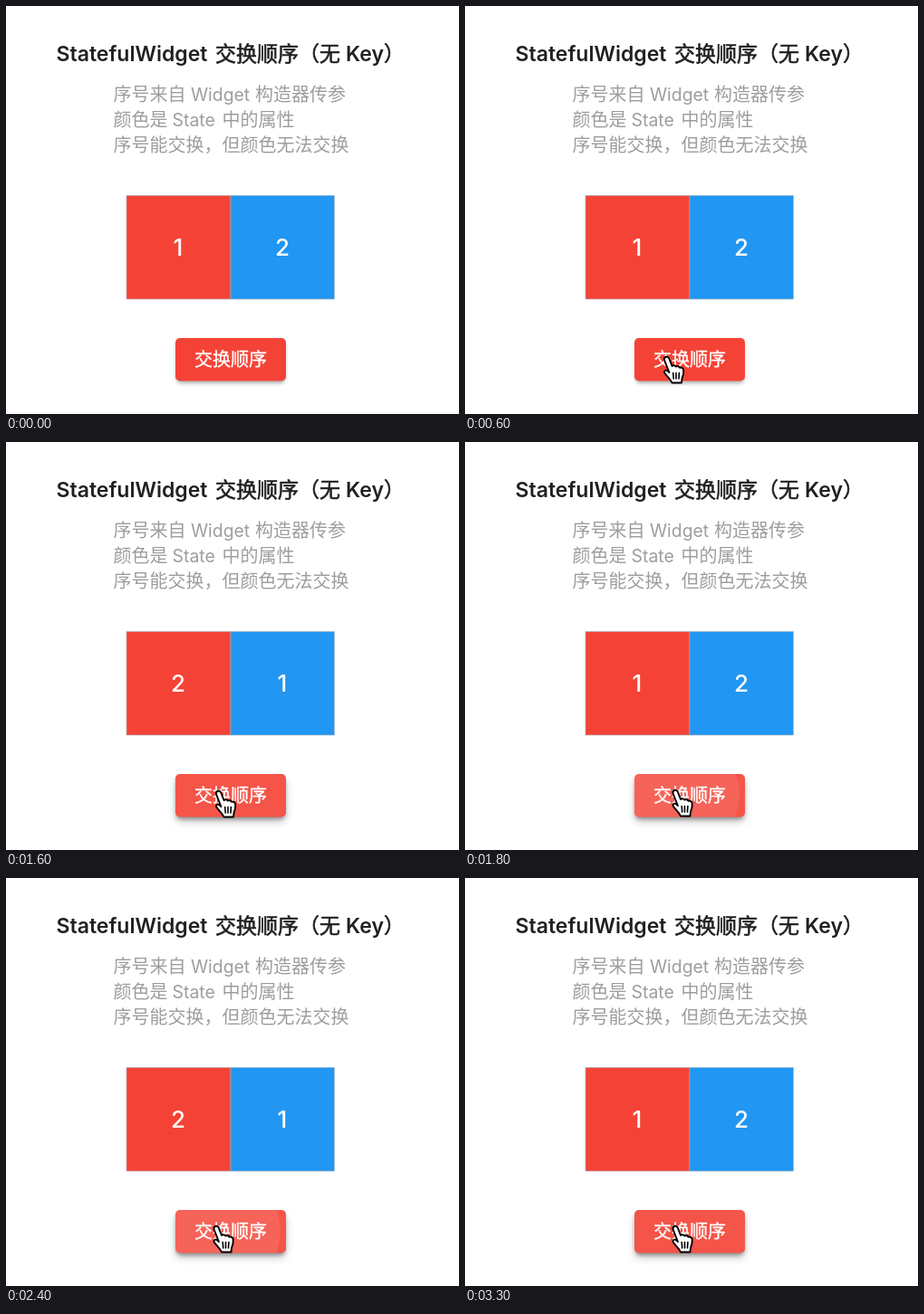
Write an HTML page that moves like this. It is 500 px wide and 451 px high and loops after 3.4 s.

```html
<!DOCTYPE html>
<html lang="zh-CN">
<head>
<meta charset="utf-8">
<style>
  html, body { margin: 0; width: 100%; height: 100%; overflow: hidden; background: #fff; }
  svg { display: block; width: 500px; height: 451px; }
  text { font-family: Inter, "Noto Sans CJK SC", "Noto Sans CJK", sans-serif; white-space: pre; }
  .cjk { font-family: "Noto Sans CJK SC", "Noto Sans CJK", sans-serif; }
  .title { font-size: 23px; font-weight: 600; fill: #202020; }
  .title .cjk { font-weight: 400; stroke: #202020; stroke-width: .6px; }
  .note { font-size: 20px; fill: #9d9d9d; }
  .note .latin { font-size: 19.4px; }
  .digit { font-size: 26px; font-weight: 500; fill: #fff; text-anchor: middle; }
  .label { font-size: 20px; fill: #fff; stroke: #fff; stroke-width: .35px; }
</style>
</head>
<body>
<svg viewBox="0 0 500 451">
  <defs>
    <filter id="soft" x="-30%" y="-60%" width="160%" height="220%"><feGaussianBlur stdDeviation="2"/></filter>
    <filter id="wide" x="-30%" y="-60%" width="160%" height="220%"><feGaussianBlur stdDeviation="5"/></filter>
    <clipPath id="buttonShape"><rect x="187" y="367" width="122" height="47.5" rx="5"/></clipPath>
  </defs>
  <rect width="500" height="451" fill="#fff"/>
  <rect id="edge" y="449" width="500" height="2" fill="#f7f7f7"/>

  <g class="title">
    <text x="55.5" y="61">StatefulWidget</text>
    <text class="cjk" x="231" y="61">交换顺序（无</text>
    <text x="375" y="61">Key</text>
    <text class="cjk" x="417" y="61">）</text>
  </g>
  <g class="note">
    <text class="cjk" x="118.5" y="105">序号来自</text>
    <text class="latin" x="204" y="105">Widget</text>
    <text class="cjk" x="275" y="105">构造器传参</text>
    <text class="cjk" x="118.5" y="133">颜色是</text>
    <text class="latin" x="183.5" y="133">State</text>
    <text class="cjk" x="238.5" y="133">中的属性</text>
    <text class="cjk" x="118.5" y="161">序号能交换，但颜色无法交换</text>
  </g>

  <g stroke="#a9b4bd" stroke-opacity=".6">
    <rect x="133" y="209.5" width="115" height="114.5" fill="#f44336"/>
    <rect x="248" y="209.5" width="114.5" height="114.5" fill="#2196f3"/>
  </g>
  <text id="left" class="digit" x="190" y="276"></text>
  <text id="right" class="digit" x="305" y="276"></text>

  <rect x="188" y="370" width="120" height="47" rx="5" opacity=".32" filter="url(#soft)"/>
  <rect id="lift" x="187" y="373" width="122" height="47" rx="6" opacity="0" filter="url(#wide)"/>
  <g clip-path="url(#buttonShape)">
    <rect x="187" y="367" width="122" height="48" fill="#f44336"/>
    <rect id="hover" x="187" y="367" width="122" height="48" fill="#fff"/>
    <circle id="ripple" cx="236" cy="390" fill="#fff"/>
  </g>
  <text class="label cjk" x="208" y="398">交换顺序</text>

  <g id="cursor" stroke-linejoin="round" stroke-linecap="round">
    <path id="arrow" d="M4 1V21L8.6 16.8L12 24.5L15.4 23L12 15.6H18.5Z" fill="#000" stroke="#fff" stroke-width="1.6"/>
    <g id="hand">
      <path d="M4.5 1C6.5 .3 8 1.5 8.6 3.3L11.5 11C13 9.8 15 10.2 15.8 11.6C17.4 10.6 19.4 11.2 20.1 12.8C22 12.2 24 13.4 24.2 15.5C24.6 19 23.8 22 22.5 25L22 29.5H11.5C10 25.5 6 22.5 3.6 19C2 16.6 4.4 14.6 6.6 16.4L8.4 18L3.3 5C2.5 3 3 1.6 4.5 1Z" fill="#fff" stroke="#000" stroke-width="1.9"/>
      <path d="M12.7 18.5L13.2 25M16 18.5V25M19.4 18.5L19 25" fill="none" stroke="#000" stroke-width="1.6"/>
    </g>
  </g>
</svg>
<script>
const LOOP = 3400, STEP = 100;
const SWAPS = [1200, 1800, 2400, 3000];
// time, x, y of the pointer
const PATH = [[100, 160, 446], [600, 217, 387], [900, 229, 385], [1600, 229, 385], [1800, 226.5, 384], [LOOP, 226.5, 384]];

const $ = id => document.getElementById(id);
const set = (id, name, value) => $(id).setAttribute(name, value);
const show = (id, on) => set(id, 'visibility', on ? 'visible' : 'hidden');
const clamp = v => Math.min(1, Math.max(0, v));
const ramp = (t, from, to) => clamp((t - from) / (to - from));
const mix = (a, b, k) => a + (b - a) * k;

function pointerAt(t) {
  let i = 1;
  while (i < PATH.length - 1 && t > PATH[i][0]) i++;
  const [t0, x0, y0] = PATH[i - 1], [t1, x1, y1] = PATH[i];
  const k = ramp(t, t0, t1), ease = k * (2 - k);
  return [mix(x0, x1, ease), mix(y0, y1, ease)];
}

function draw(t) {
  const swapped = SWAPS.filter(s => t >= s).length % 2;
  $('left').textContent = swapped ? 2 : 1;
  $('right').textContent = swapped ? 1 : 2;

  const hover = ramp(t, 600, 800);
  set('hover', 'opacity', 0.09 * hover);
  set('lift', 'opacity', 0.2 * hover);

  const press = SWAPS.find(s => t > s - 200 && t < s + 200);
  const age = press ? t - press : -200;
  set('ripple', 'r', mix(0, 67, ramp(age, -200, 0)) + 40 * ramp(age, 0, 200));
  set('ripple', 'opacity', 0.085 * ramp(age, -200, -100) * (1 - ramp(age, 0, 200)));

  const [x, y] = pointerAt(t);
  set('cursor', 'transform', `translate(${x} ${y})`);
  show('arrow', t >= 100 && t < 400);
  show('hand', t >= 400);
  show('edge', t < 100);
}

const start = performance.now();
function tick() {
  const t = (performance.now() - start) % LOOP;
  draw(Math.floor(t / STEP) * STEP);
  requestAnimationFrame(tick);
}
tick();
</script>
</body>
</html>
```
